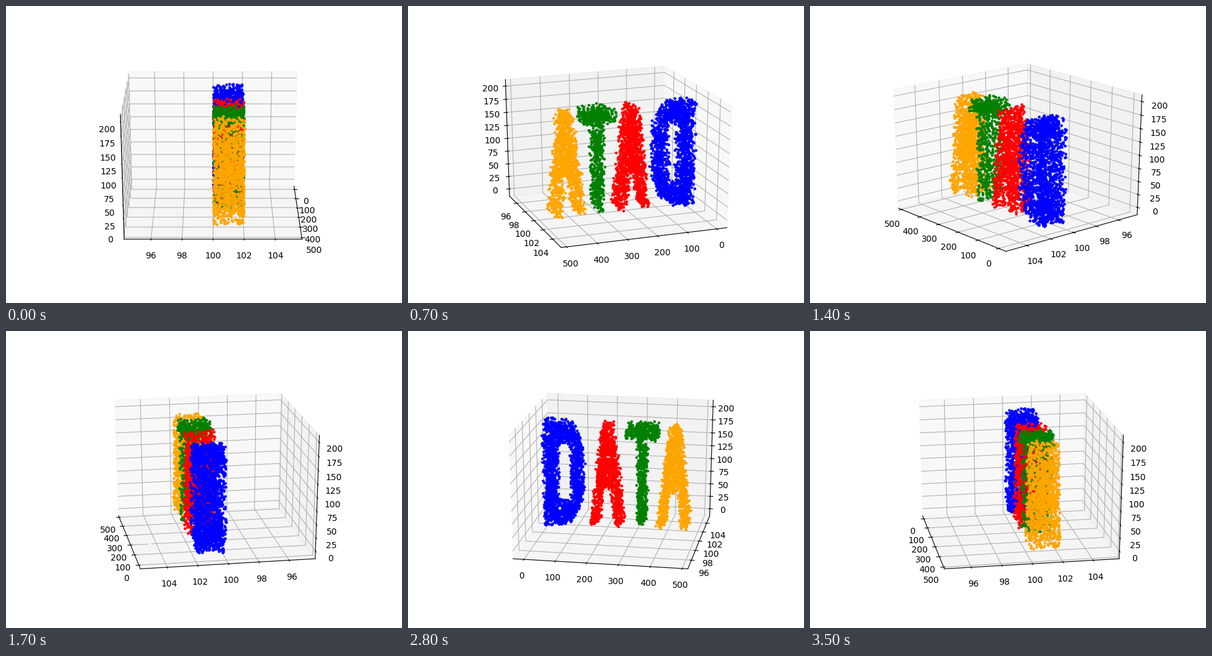
These frames come from a looping animation (640x480 px, 3.6 s). A matplotlib script:

```python
import numpy as np
import matplotlib.pyplot as plt
from matplotlib.animation import FuncAnimation

FRAMES, INTERVAL = 36, 100
ELEV, STEP = 22, 10
TOP = 194        # letter height
DENSITY = 0.12   # points per square unit of a letter's face

rng = np.random.default_rng(7)


def in_d(x, z):
    bowl = (np.clip(x - 40, 0, None) / 85) ** 2.7 + (abs(z - 97) / 97) ** 2.7 < 1
    hole = (x > 40) & (x < 91) & (z > 38) & (z < 157)
    return (x > 2) & ((x < 40) | bowl) & ~hole


def in_a(x, z):
    dx = abs(x)
    gap = (z < 73) & (dx < 29 - 0.2 * z)
    return (z > 4) & (dx < 54 - 0.2 * z) & ~gap


def in_t(x, z):
    bar = (z > 170) & (abs(x) < 50)
    stem = (z > 6) & (abs(x) < 12)
    return bar | stem


def cloud(inside, x0, x1, shift):
    """Random points in a letter, two units deep."""
    n = int(DENSITY * (x1 - x0) * TOP)
    x, z = rng.uniform(x0, x1, n), rng.uniform(0, TOP, n)
    keep = inside(x, z)
    x, z = x[keep], z[keep]
    jitter = rng.normal(0, 1, (2, x.size))
    return x + shift + jitter[0], rng.uniform(100, 102, x.size), z + jitter[1]


def limits(lo, hi):
    """Data range with a 5% margin, plus the axes' own 1/48 margin."""
    pad = 0.05 * (hi - lo)
    lo, hi = lo - pad, hi + pad
    pad = (hi - lo) / 48
    return lo - pad, hi + pad


fig = plt.figure(figsize=(6.4, 4.8), dpi=100)
ax = fig.add_subplot(projection="3d")
ax.apply_aspect = lambda position=None: None  # fill the whole subplot, not a square
ax.set_box_aspect((1, 1, 1), zoom=np.sqrt(3) / 1.8294640721620434)

letters = [
    (in_d, 0, 126, 0, "blue"),
    (in_a, -54, 54, 207, "red"),
    (in_t, -50, 50, 320, "green"),
    (in_a, -54, 54, 425, "orange"),
]
dot = dict(marker="o", s=10.5, linewidths=0, depthshade=False)
for inside, x0, x1, shift, color in letters:
    ax.scatter(*cloud(inside, x0, x1, shift), color=color, **dot)
for corner in [(0, 105, 24), (110, 95, 80)]:
    ax.scatter(*[[c] for c in corner], color="white", **dot)

ax.set_xticks(range(0, 501, 100))
ax.set_yticks(range(96, 105, 2))
ax.set_zticks(range(0, 201, 25))
ax.set_xlim(*limits(0, 482))
ax.set_ylim(*limits(95, 105))
ax.set_zlim(*limits(0, 198))


def update(i):
    # the tiny offset settles which wall is at the back in head-on views
    ax.view_init(ELEV, STEP * i + 1e-3)
    return []


anim = FuncAnimation(fig, update, frames=FRAMES, interval=INTERVAL, repeat=True)
plt.show()
```
